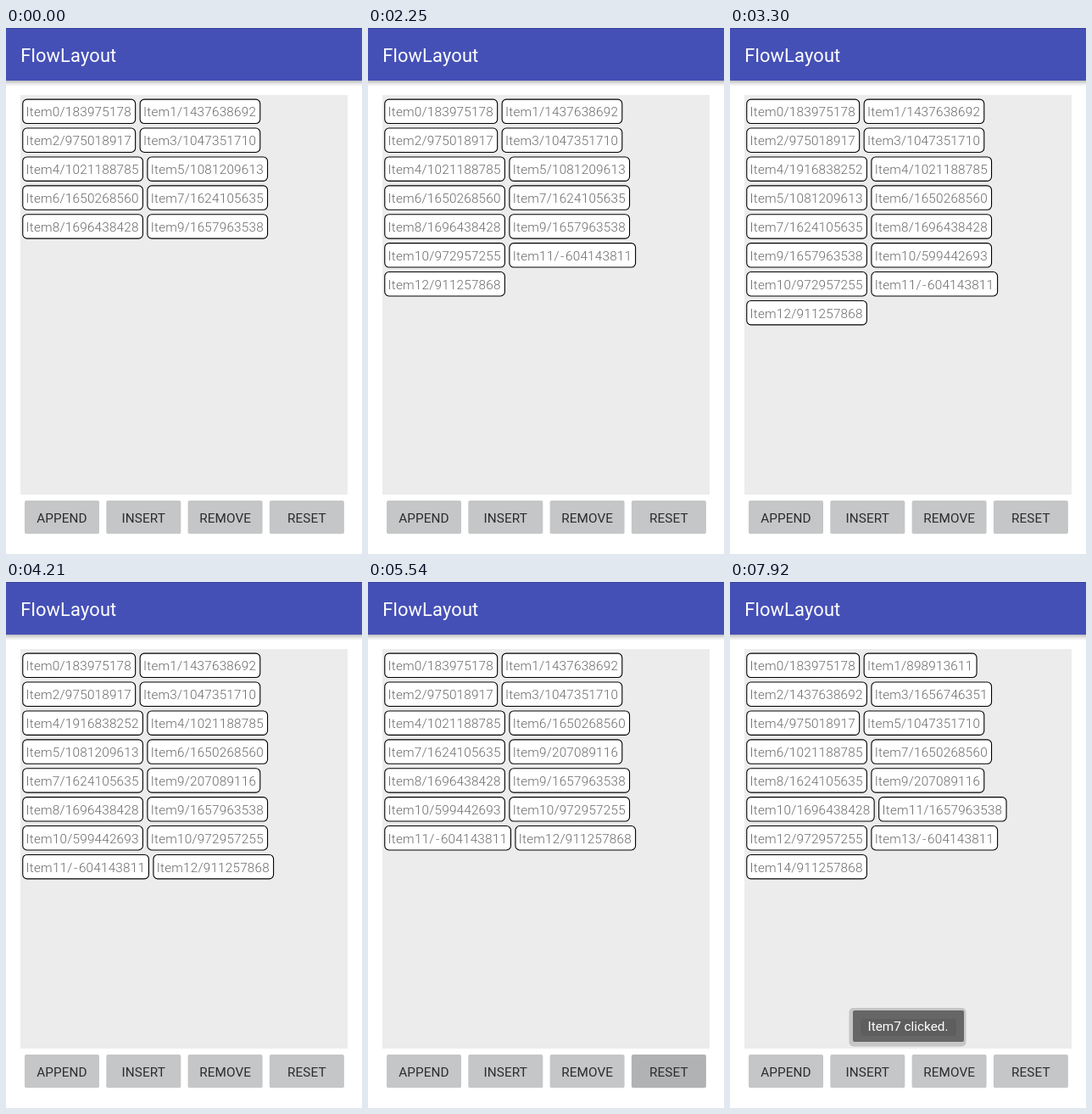
An HTML page for the animation above (7.99 s loop, 420x620 px).

```html
<!DOCTYPE html>
<html lang="en">
<head>
<meta charset="utf-8">
<title>FlowLayout</title>
<style>
  html, body { margin: 0; width: 100%; height: 100%; overflow: hidden; background: #fff; }
  svg { display: block; width: 420px; height: 620px; font-family: Roboto, sans-serif; font-size: 15.31px; }
  .title { font-size: 21.88px; letter-spacing: .15px; fill: #fff; }
  .caption { text-anchor: middle; letter-spacing: .1px; fill: #2c2c2c; }
  .tag rect { fill: #fff; stroke: #000; stroke-width: 1.1; }
  .tag text { fill: #6a6a6a; font-weight: 300; letter-spacing: .2px; }
  .toast { text-anchor: middle; fill: #fff; }
</style>
</head>
<body>
<svg viewBox="0 0 420 620">
  <defs>
    <linearGradient id="shade" x2="0" y2="1">
      <stop offset="0" stop-color="#bdbdbd"/>
      <stop offset=".5" stop-color="#e6e6e6"/>
      <stop offset="1" stop-color="#fff"/>
    </linearGradient>
  </defs>
  <rect width="420" height="620" fill="#fff"/>
  <rect y="62" width="420" height="7" fill="url(#shade)"/>
  <rect width="420" height="62" fill="#4550b6"/>
  <rect width="420" height="1" fill="#38429a"/>
  <text class="title" x="17.2" y="40">FlowLayout</text>
  <rect x="17" y="79" width="386" height="471" fill="#ececec"/>
  <g id="tags"></g>
  <g id="buttons"></g>
  <g id="toast" class="toast">
    <rect x="140.5" y="502" width="138" height="45.5" rx="5" fill="#c6c6c6"/>
    <rect x="145" y="505" width="131" height="37" rx="2" fill="#666"/>
    <rect x="154" y="515" width="113" height="20" rx="4" fill="#5e5e5e"/>
    <text x="210" y="529">Item7 clicked.</text>
  </g>
</svg>
<script>
const LOOP = 7990, FIRST = 500, STEP = 70, MOVE = 300;
const LEFT = 19.2, TOP = 83.6, ROW = 33.9, GAP = 4.4, TAG_H = 29.5, LINE = 1.1;

const initial = [183975178, 1437638692, 975018917, 1047351710, 1021188785,
  1081209613, 1650268560, 1624105635, 1696438428, 1657963538];

// Without an index the value is removed; a reset renumbers everything at once.
const edits = [
  { at: 415, value: 972957255, index: 10 },
  { at: 1045, value: -604143811, index: 11 },
  { at: 1675, value: 911257868, index: 12 },
  { at: 2367, value: 599442693, index: 10 },
  { at: 2995, value: 1916838252, index: 4 },
  { at: 3630, value: 207089116, index: 9 },
  { at: 4247, value: 1081209613 },
  { at: 4877, value: 1916838252 },
  { at: 5610, value: 898913611, index: 1, reset: true },
  { at: 6170, value: 1656746351, index: 3, reset: true },
  { at: 6590, value: 599442693, reset: true },
];

// Only the outer buttons visibly darken when pressed.
const buttons = [
  { name: 'APPEND', presses: [[920, 990], [1550, 1690]] },
  { name: 'INSERT', presses: [] },
  { name: 'REMOVE', presses: [] },
  { name: 'RESET', presses: [[5540, 5610], [6100, 6170], [6450, 6590]] },
];

const $ = id => document.getElementById(id);
const clamp = v => Math.min(1, Math.max(0, v));
const lerp = (a, b, p) => a + (b - a) * p;
const ease = v => (1 - Math.cos(Math.PI * v)) / 2;
const makeItem = (value, i) => ({ value, label: `Item${i}/${value}` });

function tagWidth(label) {
  return 2.75 + 8.75 * label.length - (label.includes('-') ? 1.7 : 0);
}

// Two tags fit on each row of the panel.
function layout(items) {
  return new Map(items.map((item, i) => [item.value, {
    x: i % 2 ? LEFT + tagWidth(items[i - 1].label) + GAP : LEFT,
    y: TOP + ROW * Math.floor(i / 2),
  }]));
}

function makeState(items, edit) {
  return { items, places: layout(items), at: edit.at, reset: edit.reset };
}

const states = [makeState(initial.map(makeItem), { at: -MOVE })];
for (const edit of edits) {
  let items = states[states.length - 1].items.slice();
  if (edit.index === undefined) items = items.filter(item => item.value !== edit.value);
  else items.splice(edit.index, 0, makeItem(edit.value, edit.index));
  if (edit.reset) items = items.map((item, i) => makeItem(item.value, i));
  states.push(makeState(items, edit));
}

function tagMarkup({ value, label }, x, y, scale, opacity, pressed) {
  const w = tagWidth(label), cx = w / 2, cy = TAG_H / 2;
  const dash = label.indexOf('-');
  const dx = dash < 0 ? '' : ` dx="${'0 '.repeat(dash)}1.4 1.4"`;
  return `<g class="tag" opacity="${opacity}" transform="translate(${x + cx} ${y + cy}) scale(${scale}) translate(${-cx} ${-cy})">
    <rect x="${LINE / 2}" y="${LINE / 2}" width="${w - LINE}" height="${TAG_H - LINE}" rx="5"${pressed ? ' style="fill:#e6e6e6"' : ''}/>
    <text x="4.4" y="20.8"${dx}>${label}</text></g>`;
}

function drawTags(t) {
  const n = states.filter(s => s.at <= t).length - 1;
  const now = states[n], before = states[n - 1] || now;
  const part = now.reset ? 1 : clamp((t - now.at) / MOVE);
  const p = ease(part);
  const leaving = part < 1 && before.items.length > now.items.length;
  const items = leaving ? before.items : now.items;

  return items.map(item => {
    const from = before.places.get(item.value), to = now.places.get(item.value);
    const pressed = item.value === 1650268560 && t >= 7640 && t < 7780;
    if (!to) return tagMarkup(item, from.x, from.y, 1 - p, (1 - part) ** 2);
    if (!from) return tagMarkup(item, to.x, to.y, p, part);
    return tagMarkup(item, lerp(from.x, to.x, p), lerp(from.y, to.y, p), 1, 1, pressed);
  }).join('');
}

function drawButtons(t) {
  return buttons.map(({ name, presses }, i) => {
    const x = 22 + 96.3 * i;
    const down = presses.some(([from, to]) => t >= from && t < to);
    return `<rect x="${x}" y="557" width="88" height="39.2" rx="2" fill="${down ? '#b1b2b3' : '#c5c6c7'}"/>
      <text class="caption" x="${x + 44}" y="583">${name}</text>`;
  }).join('');
}

function render(t) {
  $('tags').innerHTML = drawTags(t);
  $('buttons').innerHTML = drawButtons(t);
  const fade = clamp((t - 7640) / 280);
  $('toast').setAttribute('opacity', 1 - (1 - fade) ** 2);
}

// The picture advances in even steps after an initial hold.
function stepped(t) {
  return t < FIRST ? 0 : FIRST + Math.floor((t - FIRST) / STEP) * STEP;
}

const start = performance.now();
let shown = -1;
function tick() {
  const t = stepped((performance.now() - start) % LOOP);
  if (t !== shown) render(shown = t);
  requestAnimationFrame(tick);
}
tick();
</script>
</body>
</html>
```
